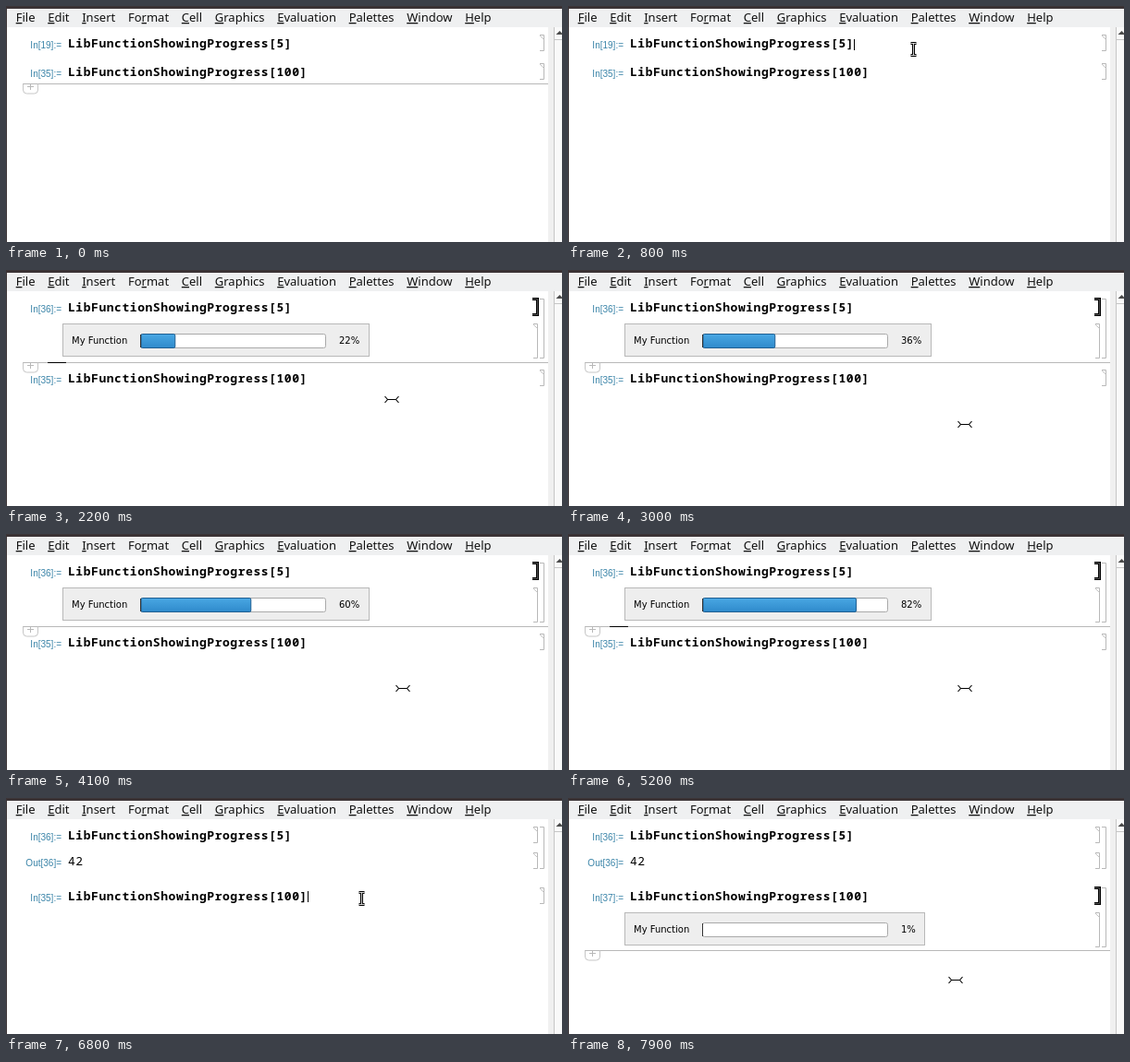
Animation of 601 by 256 pixels, one loop 8 s. Source, as an HTML page:

```html
<!DOCTYPE html>
<html lang="en">
<head>
<meta charset="utf-8">
<title>Notebook progress</title>
<style>
  html, body { margin: 0; width: 100%; height: 100%; overflow: hidden; background: #fff; }
  svg { display: block; width: 601px; height: 256px; }
  .menu { font: 13px "Noto Sans", "Open Sans", sans-serif; fill: #111; }
  .code { font: 600 13px "Noto Sans Mono", "DejaVu Sans Mono", monospace; letter-spacing: .55px; fill: #000; }
  .out { font-weight: 400; }
  .label { font: 10px "Liberation Sans", Arial, sans-serif; fill: #3a84a8; text-anchor: end; }
  .panel { font: 10px "DejaVu Sans", sans-serif; fill: #000; }
  .crisp { shape-rendering: crispEdges; }
  .key { text-decoration: underline; }
  path { fill: none; }
</style>
</head>
<body>
<svg viewBox="0 0 601 256">
  <defs>
    <linearGradient id="blue" x1="0" y1="0" x2="0" y2="1">
      <stop offset="0" stop-color="#49a7e3"/>
      <stop offset="1" stop-color="#2f8acb"/>
    </linearGradient>
  </defs>
  <rect width="601" height="256" fill="#fff"/>
  <g class="crisp">
    <rect width="601" height="23" fill="#eff0f1"/>
    <rect width="601" height="3" fill="#3b3335"/>
    <rect x="586" y="23" width="15" height="233" fill="#f0f0f0"/>
    <rect x="593" y="23" width="8" height="233" fill="#f9f9f9"/>
    <rect x="592" y="23" width="1" height="233" fill="#c6c6c6"/>
    <rect x="593" y="36" width="8" height="1" fill="#c6c6c6"/>
    <rect width="1" height="256" fill="#3b3335"/>
  </g>
  <polygon points="594.5,31 598.5,27 602.5,31" fill="#4a4a4a"/>
  <text id="menu" class="menu" x="10.7" y="17"></text>
  <g id="scene"></g>
  <g id="pointer"></g>
</svg>
<script>
const LOOP = 8000, STEP = 100;
const CLICK_1 = 600, RUN_1 = 900, DONE_1 = 6100, CLICK_2 = 6800, RUN_2 = 7100;
const GREY = "#b8b8b8";
const $ = id => document.getElementById(id);

// an underscore marks the underlined letter
const MENU = "_File _Edit _Insert Fo_rmat _Cell _Graphics _Evaluation _Palettes _Window _Help";
$("menu").innerHTML = MENU.split(" ").map((item, i) =>
  `<tspan dx="${i ? 13.7 : 0}">${item.replace(/_(.)/, '<tspan class="key">$1</tspan>')}</tspan>`).join("");

// pointer moves: start, end, x, y
const MOVES = [
  [100, 300, 369, 48], [500, 600, 374, 46], [1500, 2400, 429, 167],
  [6200, 6700, 385, 108], [7300, 7800, 419, 197]
];

const ramp = (t, from, to) => Math.min(1, Math.max(0, (t - from) / (to - from)));
const refresh = (t, start, period) => start + Math.floor((t - start) / period) * period;

function progress(t) {
  if (t >= RUN_2) return (t - RUN_2) / 1000;
  return 12 * ramp(t, RUN_1, 1500) + 48 * ramp(t, 1500, 4100) + 38 * ramp(t, 4100, 5900);
}

const text = (cls, x, y, s) => `<text class="${cls}" x="${x}" y="${y}">${s}</text>`;
const rect = (x, y, w, h, fill, more = "") =>
  `<rect x="${x}" y="${y}" width="${w}" height="${h}" fill="${fill}" ${more}/>`;
const stroke = (d, color, width = 1) => `<path d="${d}" stroke="${color}" stroke-width="${width}"/>`;

const input = (n, arg, y) =>
  text("label", 60, y + 1, `In[${n}]:=`) + text("code", 67, y, `LibFunctionShowingProgress[${arg}]`);
const textCaret = (x, y) => rect(x, y, 1, 12, "#000");

function bracket(x, top, bottom, flag = true) {
  return stroke(`M${x} ${top + .5}h4.5V${bottom - .5}h-4.5`, GREY) +
    (flag ? stroke(`M${x} ${top + 1}l4.5 4.5`, "#c4c4c4") : "");
}

function selected(top, bottom) {
  const d = `M569 ${top + 1.5}h5.5V${bottom - 1.5}h-5.5`;
  return stroke(d, "#000", 3) + stroke(d, "#666", .8);
}

function insertion(y, caret) {
  return `<g class="crisp">${rect(18, y, 568, 1, GREY)}${caret ? rect(45, y, 20, 1, "#000") : ""}</g>` +
    stroke(`M18.5 ${y + .5}v6.5q0 4 4 4h8q4 0 4-4v-6.5`, "#c6c6c6") +
    stroke(`M23 ${y + 3.5}h7m-3.5-3.5v7`, GREY);
}

function panel(y, t) {
  const percent = Math.round(progress(refresh(t, 1500, 260)));
  const fill = t < RUN_2 ? 2 * progress(refresh(t, 1490, 370)) : 0;
  return rect(61.5, y + .5, percent < 10 ? 324 : 331, 35, "#eee", `stroke="${GREY}"`) +
    text("panel", 71, y + 22, "My Function") +
    rect(145.5, y + 11.5, 200, 15, "#fff", 'rx="2" stroke="#aaa"') +
    (fill > 1 ? rect(146, y + 11.5, fill - .5, 15, "url(#blue)", 'rx="1.5" stroke="#1f5f92"') : "") +
    rect(145, y + 12, 1, 14, "#333") +
    text("panel", 360, y + 22, percent + "%");
}

const finished = () =>
  input(36, 5, 45) + text("label", 60, 73.5, "Out[36]=") + text("code out", 67, 73, "42") +
  bracket(570, 31, 49) + bracket(570, 59, 77) + bracket(577, 31, 77, false);

function scene(t) {
  const blink = start => t >= start && (t - start) % 1000 < 600;
  if (t < RUN_1) {
    return input(19, 5, 45) + input(35, 100, 76) + bracket(577, 31, 49) + bracket(577, 62, 80) +
      (t < CLICK_1 ? insertion(84, false) : textCaret(309, 36));
  }
  if (t < DONE_1) {
    return input(36, 5, 45) + panel(58, t) + input(35, 100, 122) +
      selected(30, 50) + bracket(570, 58, 96) + bracket(577, 31, 96, false) + bracket(577, 108, 126) +
      insertion(100, blink(1200));
  }
  if (t < RUN_2) {
    return finished() + input(35, 100, 111) + bracket(577, 97, 115) +
      (t < CLICK_2 ? insertion(89, blink(DONE_1)) : textCaret(326, 101));
  }
  return finished() + input(37, 100, 111) + panel(124, t) +
    selected(96, 116) + bracket(570, 124, 162) + bracket(577, 97, 162, false) +
    insertion(165, blink(RUN_2));
}

function pointer(t) {
  if (t < MOVES[0][0]) return "";
  let x = 421, y = 85;
  for (const [start, end, toX, toY] of MOVES) {
    const k = ramp(t, start, end);
    x = Math.round(x + (toX - x) * k);
    y = Math.round(y + (toY - y) * k);
  }
  // lies flat between cells, stands upright over text
  if (t < 200 || y > 126) {
    return stroke(`M${x - 7.5} ${y - 3}l3 3.5l-3 3.5m3-3.5h9m3-3.5l-3 3.5l3 3.5`, "#000", 1.1);
  }
  const beam = `M${x - 3.5} ${y - 5.5}h6m-3 0v13m-3 0h6`;
  return stroke(beam, "#000", 3) + stroke(beam, "#fff", .8);
}

let shown = -1;
function draw() {
  const t = Math.floor(performance.now() % LOOP / STEP) * STEP;
  if (t !== shown) {
    $("scene").innerHTML = scene(t);
    $("pointer").innerHTML = pointer(t);
    shown = t;
  }
  requestAnimationFrame(draw);
}
draw();
</script>
</body>
</html>
```
